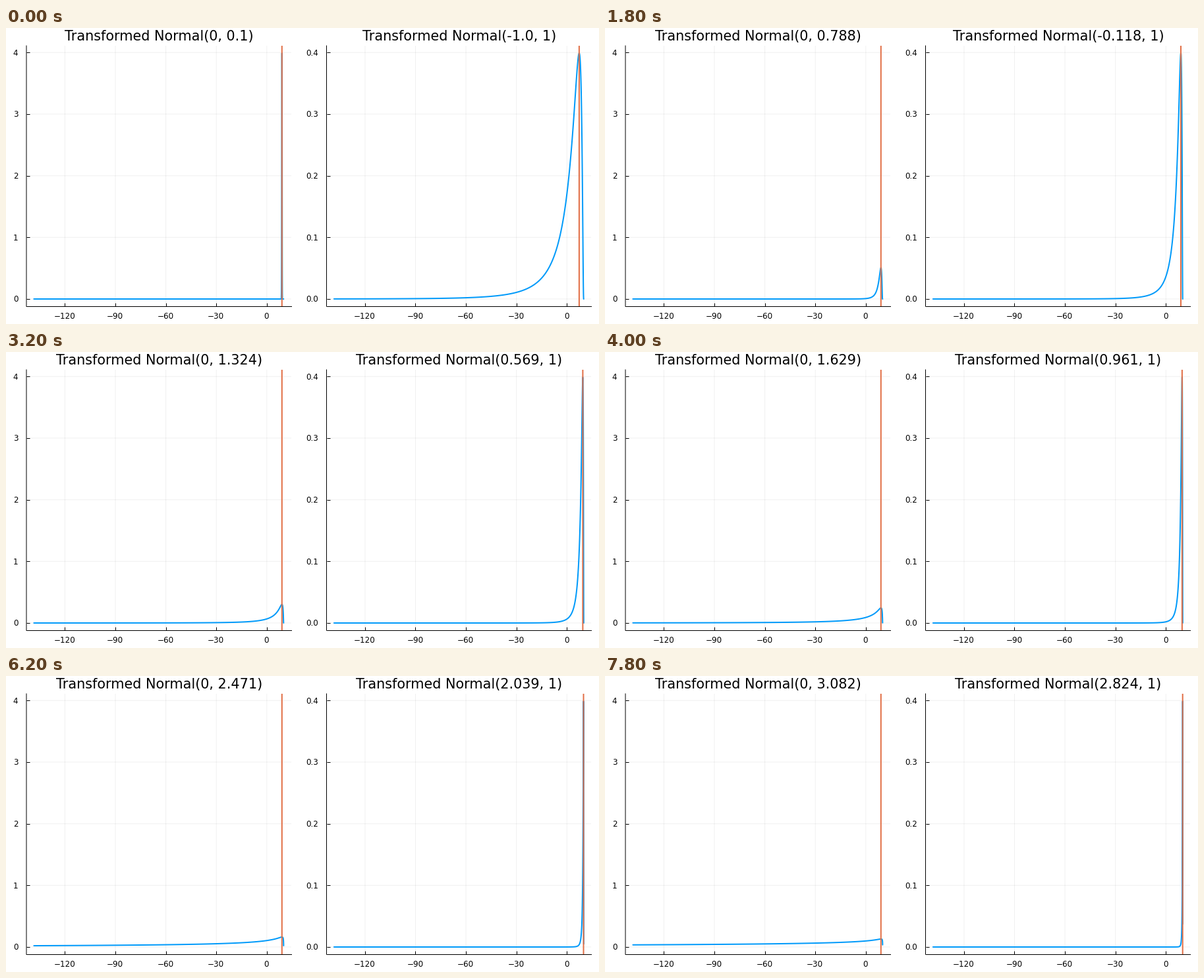
Animation, 900 px wide and 450 px high, one loop 8 s. Source, as a matplotlib script:

```python
import numpy as np
import matplotlib.pyplot as plt
from matplotlib.animation import FuncAnimation

W, H, DPI = 900, 450, 100
PX = 72 / DPI                      # points per pixel
TOP, BOTTOM, WIDTH = 27, 423.2, 401.7
FRAMES, STEPS = 40, 51
BLUE, ORANGE = "#009AFA", "#E26F46"
PEAK = 1 / np.sqrt(2 * np.pi)

plt.rcParams["font.family"] = "DejaVu Sans"
plt.rcParams["path.simplify"] = False

fig = plt.figure(figsize=(W / DPI, H / DPI), dpi=DPI, facecolor="white")


def warp(z):
    return 10 - np.exp(-z)


def normal(z, mu, sigma):
    return PEAK / sigma * np.exp(-0.5 * ((z - mu) / sigma) ** 2)


def widen(lo, hi):
    pad = 0.03 * (hi - lo)
    return lo - pad, hi + pad


def label(x, y, text, size, ha="center"):
    return fig.text(x / W, 1 - y / H, text, fontsize=size * PX,
                    ha=ha, va="baseline")


z = np.linspace(-5, 5, 1001)
x = warp(z)
xlim = widen(x[0], x[-1])
xticks = range(-120, 1, 30)


class Panel:
    def __init__(self, left, ymax, yticks, fmt):
        ax = fig.add_axes([left / W, 1 - BOTTOM / H,
                           WIDTH / W, (BOTTOM - TOP) / H])
        ylim = widen(0, ymax)
        ax.set(xlim=xlim, ylim=ylim, xticks=xticks, yticks=yticks)
        ax.patch.set_visible(False)
        ax.set_axisbelow(True)
        ax.grid(color="black", alpha=0.06, lw=PX, snap=False)
        ax.tick_params(direction="in", length=5 * PX, width=PX,
                       labelbottom=False, labelleft=False)
        for side, spine in ax.spines.items():
            spine.set_linewidth(PX)
            spine.set_visible(side in ("left", "bottom"))
        ax.spines["left"].set_snap(False)

        for t in xticks:
            px = left + WIDTH * (t - xlim[0]) / (xlim[1] - xlim[0])
            label(px - 0.6, 441.8, str(t).replace("-", "\u2212"), 11.9)
        for t in yticks:
            py = BOTTOM - (BOTTOM - TOP) * (t - ylim[0]) / (ylim[1] - ylim[0])
            label(left - 12.6, py + 4.5, fmt.format(t), 11.9, "right")

        style = dict(lw=2 * PX, solid_capstyle="round",
                     solid_joinstyle="round", snap=False)
        self.curve, = ax.plot([], [], color=BLUE, zorder=3, **style)
        self.mode = ax.axvline(0, color=ORANGE, zorder=4, **style)
        self.title = label(left + WIDTH / 2 + 0.7, 18.5, "", 20.8)

    def show(self, mu, sigma, text):
        self.curve.set_data(x, normal(z, mu, sigma))
        self.mode.set_xdata([warp(mu)] * 2)
        self.title.set_text(f"Transformed Normal({text})")


spread = Panel(31, PEAK / 0.1, [0, 1, 2, 3, 4], "{}")
shift = Panel(486.5, PEAK, [0, 0.1, 0.2, 0.3, 0.4], "{:.1f}")


def draw(i):
    sigma = 0.1 + 3.9 * i / STEPS
    mu = -1 + 5 * i / STEPS
    spread.show(0, sigma, f"0, {round(sigma, 3)}")
    shift.show(mu, 1, f"{round(mu, 3)}, 1")
    return []


anim = FuncAnimation(fig, draw, frames=FRAMES, init_func=lambda: draw(0),
                     interval=200, repeat=True, repeat_delay=0)
plt.show()
```
